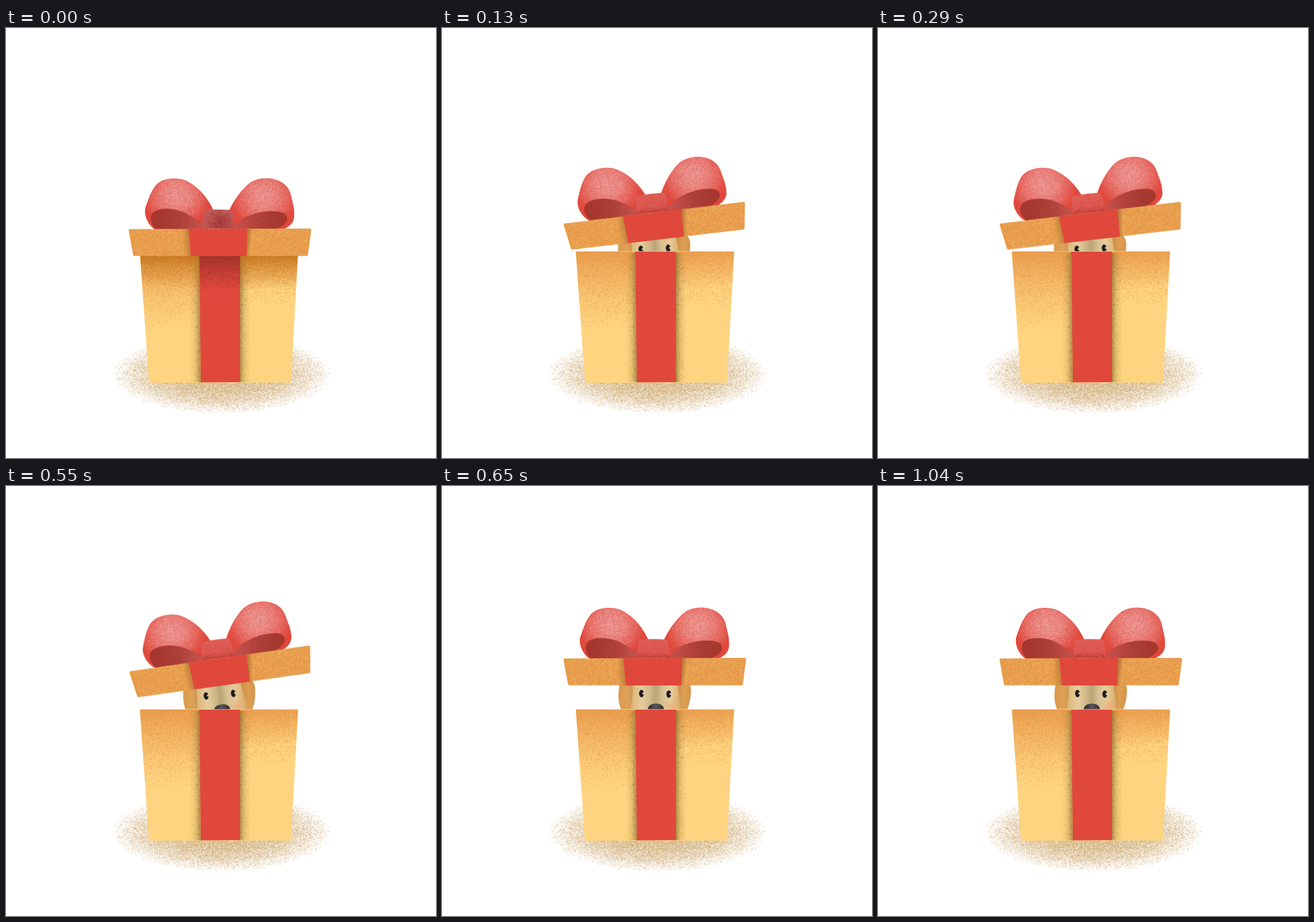
These frames come from a looping animation (748x748 px, 1300 ms). An HTML page with a canvas:

```html
<!DOCTYPE html>
<html lang="en">
<head>
<meta charset="utf-8">
<title>Puppy in a gift box</title>
<style>
  html, body { margin: 0; width: 100%; height: 100%; overflow: hidden; background: #fff; }
  canvas { display: block; width: 100vw; height: 100vh; }
</style>
</head>
<body>
<canvas id="stage" width="748" height="748"></canvas>
<script>
const start = performance.now();
const SIZE = 748, LOOP = 1300;
const RED = '#e0483c', DARK_RED = '#a5372e', ORANGE = '#e89c4c';
const stage = document.getElementById('stage').getContext('2d');

let seed = 7;
function rnd() {
  seed = (seed + 0x6D2B79F5) | 0;
  let n = Math.imul(seed ^ (seed >>> 15), 1 | seed);
  n = (n + Math.imul(n ^ (n >>> 7), 61 | n)) ^ n;
  return ((n ^ (n >>> 14)) >>> 0) / 4294967296;
}
const clamp = v => Math.max(0, Math.min(1, v));
const path = d => new Path2D(d);

function layer(draw) {
  const canvas = document.createElement('canvas');
  canvas.width = canvas.height = SIZE;
  draw(canvas.getContext('2d'));
  return canvas;
}

function fill(c, shape, style) {
  c.fillStyle = style;
  c.fill(shape);
}

// Fill and widen the shape by a stroke, which rounds its corners.
function roundFill(c, shape, style, width) {
  fill(c, shape, style);
  c.strokeStyle = style;
  c.lineWidth = width;
  c.lineJoin = 'round';
  c.stroke(shape);
}

function addStops(gradient, stops) {
  stops.forEach(([at, color]) => gradient.addColorStop(at, color));
  return gradient;
}
const linear = (c, x0, y0, x1, y1, ...stops) =>
  addStops(c.createLinearGradient(x0, y0, x1, y1), stops);
const radial = (c, x, y, r, ...stops) =>
  addStops(c.createRadialGradient(x, y, 0, x, y, r), stops);

// Scatter specks inside a shape; density(x, y) is the chance per pixel.
function grain(c, shape, [x0, y0, x1, y1], color, density, size = 1.25) {
  c.save();
  c.clip(shape);
  c.fillStyle = color;
  for (let y = y0; y < y1; y++) {
    for (let x = x0; x < x1; x++) {
      if (rnd() < density(x, y)) c.fillRect(x + rnd() - .5, y + rnd() - .5, size, size);
    }
  }
  c.restore();
}

const wholeStage = path(`M0 0H${SIZE}V${SIZE}H0Z`);
const bodyShape = path('M234 389.5H507L494.5 615.5L250 616Z');
const bodyRibbon = path('M336 389H407V616L339 616.5Z');
const leftPanel = path('M233 389H336L339 617H249Z');
const rightPanel = path('M407 389H508L495 616H407Z');
const bodyBox = [230, 386, 512, 618];

const ground = layer(c => {
  const [cx, cy, rx, ry] = [374.5, 602, 192, 69];
  const box = [182, 532, 568, 672];
  const tan = a => `rgba(201,160,98,${a})`;
  const fade = (x, y) => clamp((1 - Math.hypot((x - cx) / rx, (y - cy) / ry)) * 1.8);
  c.save();
  c.translate(cx, cy);
  c.scale(rx, ry);
  c.fillStyle = radial(c, 0, 0, 1,
    [0, tan(.62)], [.4, tan(.54)], [.65, tan(.36)], [.85, tan(.15)], [1, tan(0)]);
  c.fillRect(-1, -1, 2, 2);
  c.restore();
  grain(c, wholeStage, box, tan(.6), (x, y) => .42 * fade(x, y));
  grain(c, wholeStage, box, 'rgba(255,255,255,.6)', (x, y) => .13 * fade(x, y) ** .5);
});

const body = layer(c => {
  roundFill(c, bodyShape, '#fed480', 2.5);
  const orange = a => `rgba(232,153,74,${a})`;
  fill(c, leftPanel, linear(c, 0, 388, 0, 525,
    [0, orange(.92)], [.25, orange(.6)], [.6, orange(.22)], [1, orange(0)]));
  fill(c, rightPanel, linear(c, 0, 388, 6, 482,
    [0, orange(.95)], [.4, orange(.75)], [.75, orange(.32)], [1, orange(0)]));
  grain(c, leftPanel, bodyBox, orange(.55), (x, y) => .42 * clamp(1 - (y - 388) / 148) ** 1.5);
  grain(c, rightPanel, bodyBox, orange(.55), (x, y) => .45 * clamp(1 - (y - 388) / 100) ** 1.1);
  grain(c, bodyShape, [230, 392, 512, 480], 'rgba(250,200,118,.6)',
    (x, y) => .08 * clamp((y - 390) / 30));

  const shade = a => `rgba(137,108,48,${a})`;
  fill(c, path('M318 391H336L339 616H321Z'), linear(c, 320, 500, 338, 500,
    [0, shade(0)], [.55, shade(.16)], [1, shade(.6)]));
  fill(c, path('M407 391H425V616H407Z'), linear(c, 407, 0, 425, 0,
    [0, shade(.62)], [.4, shade(.18)], [1, shade(0)]));
  grain(c, leftPanel, [316, 392, 342, 617], shade(.3),
    (x, y) => .3 * clamp(1 - (336 + (y - 389) / 76 - x) / 16) ** 1.4);
  grain(c, rightPanel, [405, 392, 428, 617], shade(.3),
    (x, y) => .3 * clamp(1 - (x - 407) / 17) ** 1.4);
  fill(c, bodyRibbon, RED);
});

// The shade a closed lid throws on the box.
const closedShade = layer(c => {
  const panels = path('M233 389H336V617H249ZM407 389H508L495 616H407Z');
  const brown = a => `rgba(190,112,22,${a})`;
  const wine = a => `rgba(140,46,40,${a})`;
  fill(c, panels, linear(c, 0, 396, 0, 455, [0, brown(.72)], [.35, brown(.36)], [1, brown(0)]));
  grain(c, panels, [230, 394, 512, 470], brown(.45),
    (x, y) => .3 * clamp(1 - (y - 394) / 66) ** 1.6);
  fill(c, bodyRibbon, linear(c, 0, 396, 0, 455, [0, wine(.66)], [.4, wine(.34)], [1, wine(0)]));
  grain(c, bodyRibbon, [334, 394, 409, 465], wine(.42),
    (x, y) => .4 * clamp(1 - (y - 394) / 68) ** 1.4);
});

const knotShape = path(
  'M347 267Q368 265.5 389 267Q394 268 394 273L396 299H340.5L341 274Q341 268 347 267Z');

function loop(c, outer, inner, box, [hx, hy], darkX, lightX) {
  const pink = a => `rgba(240,172,170,${a})`;
  roundFill(c, outer, RED, 1.2);
  c.save();
  c.clip(outer);
  c.fillStyle = radial(c, hx, hy, 58, [0, pink(.75)], [.45, pink(.5)], [1, pink(0)]);
  c.fillRect(box[0], box[1], box[2] - box[0], box[3] - box[1]);
  c.restore();
  grain(c, outer, box, 'rgba(246,190,188,.4)',
    (x, y) => .32 * clamp(1 - Math.hypot((x - hx) / 54, (y - hy) / 48)));
  grain(c, outer, box, 'rgba(220,84,78,.4)',
    (x, y) => .16 * clamp(1 - Math.hypot(x - hx, y - hy) / 58));
  fill(c, inner, linear(c, darkX, 0, lightX, 0,
    [0, DARK_RED], [.5, '#ac3f37'], [1, '#c5504a']));
  grain(c, inner, box, 'rgba(205,95,90,.45)',
    (x, y) => .24 * clamp((x - darkX) / (lightX - darkX) - .2));
}

const lid = layer(c => {
  loop(c,
    path('M257 300C244 291 237 273 242 260C247 246 252 232 261 222C275 209 304 211 317 219.5C336 231 350 249 359 269L348 300Z'),
    path('M259 300C250 292 246 278 255 270C270 261 295 264 312 273C327 281 336 287 343 293V300Z'),
    [236, 208, 362, 301], [295, 242], 262, 340);
  loop(c,
    path('M386 269C393 254 405 236 418 224C431 211 454 209 471 216C486 222 492 233 494 245C497 258 500 268 498.5 281C496 291 490 295 481 300H390Z'),
    path('M394 300C398 288 411 280 425 275C444 268 466 267 478 271C488 274 489 282 485 288C480 295 473 298 464 300Z'),
    [382, 208, 502, 301], [446, 243], 480, 398);

  fill(c, knotShape, linear(c, 0, 267, 0, 299, [0, '#df5b53'], [.7, '#d9524a'], [1, '#c2423b']));
  grain(c, knotShape, [338, 265, 398, 300], 'rgba(232,124,118,.45)', () => .12);
  grain(c, knotShape, [338, 290, 398, 300], 'rgba(165,50,44,.4)', (x, y) => (y - 290) / 45);

  const slab = path('M214 302.5L526.5 301.5L520.8 344.2H221.6Z');
  roundFill(c, slab, ORANGE, 5);
  grain(c, wholeStage, [216, 300, 525, 346], 'rgba(248,200,124,.6)',
    (x, y) => x > 216 + (y - 300) / 6 && x < 525 - (y - 300) / 8 ? .13 : 0);
  grain(c, slab, [210, 298, 530, 348], 'rgba(217,138,54,.45)', () => .12);

  const shade = a => `rgba(150,100,40,${a})`;
  fill(c, path('M305 300H316L319 347H308Z'), linear(c, 305, 324, 318, 323,
    [0, shade(0)], [1, shade(.5)]));
  fill(c, path('M418 300H426L424 347H416Z'), linear(c, 417, 323, 425, 324,
    [0, shade(.6)], [1, shade(0)]));
  fill(c, path('M315.5 299.5L418 299L416.5 347H319.5Z'), RED);
});

const closedKnot = layer(c => {
  fill(c, knotShape, radial(c, 370, 287, 34,
    [0, 'rgba(148,52,50,.85)'], [1, 'rgba(182,88,86,.75)']));
  grain(c, knotShape, [338, 265, 398, 300], 'rgba(222,140,138,.45)',
    (x, y) => .05 + .22 * clamp(Math.hypot(x - 372, y - 290) / 34 - .2));
});

function eye(c, x, y) {
  c.fillStyle = '#1f1c1a';
  c.beginPath();
  c.ellipse(x, y, 4.2, 6.4, 0, 0, 7);
  c.fill();
  c.fillStyle = '#e9dcc0';
  c.beginPath();
  c.ellipse(x + 3.1, y - .3, 1.6, 1.8, 0, 0, 7);
  c.fill();
}

const dog = layer(c => {
  fill(c, path('M324 336H416L422 430H318Z'), linear(c, 322, 0, 418, 0,
    [0, '#cd9a57'], [.12, '#dfba7e'], [.27, '#e5cd9e'], [.4, '#d3bb8c'],
    [.52, '#bba475'], [.64, '#d6bf90'], [.78, '#e6cd9e'], [.9, '#e0b87c'], [1, '#cf9850']));
  fill(c, path('M340 370H412V420H340Z'), radial(c, 400, 385, 15,
    [0, 'rgba(242,160,112,.6)'], [1, 'rgba(242,160,112,0)']));
  fill(c, path('M310 340H331C333 360 331 380 323 400C315 402 306 380 307 364C307 357 308 348 310 340Z'),
    linear(c, 307, 0, 333, 0, [0, '#d99a4c'], [.6, '#dea158'], [1, '#cb9551']));
  fill(c, path('M409 340H427C432 346 434 352 433 360C432 376 427 392 420 400C417 385 411 360 409 340Z'),
    linear(c, 409, 0, 434, 0, [0, '#c68d46'], [.45, '#dc9f54'], [1, '#d4934a']));
  eye(c, 347, 361);
  eye(c, 394.5, 362);
  fill(c, path('M358 389C358 382 364 378.5 372 378.5C380 378.5 386 382 386 389C383 400 361 400 358 389Z'),
    radial(c, 372, 383, 15, [0, '#5b5a5c'], [.5, '#403f42'], [1, '#2f2e31']));
});

// Each pose places the lid by its left corner and the head by its middle.
const LID_PIN = [211, 300], HEAD_PIN = [371, 361.5];
const poses = [
  { until: 130, lid: [213, 349.8, 0], closed: true },
  { until: 390, lid: [211, 340.3, -6.7], head: [370, 384, -3.6] },
  { until: 650, lid: [214, 322.5, -8], head: [372, 363, -6.5] },
  { until: LOOP, lid: [211, 300, 0], head: [371, 361.5, 0] }
];

function place([x, y, degrees], [px, py], ...images) {
  stage.save();
  stage.translate(x, y);
  stage.rotate(degrees * Math.PI / 180);
  images.forEach(image => stage.drawImage(image, -px, -py));
  stage.restore();
}

function render(time) {
  const pose = poses.find(p => time < p.until);
  stage.fillStyle = '#fff';
  stage.fillRect(0, 0, SIZE, SIZE);
  stage.drawImage(ground, 0, 0);
  if (pose.head) place(pose.head, HEAD_PIN, dog);
  stage.drawImage(body, 0, 0);
  if (pose.closed) stage.drawImage(closedShade, 0, 0);
  place(pose.lid, LID_PIN, lid, ...(pose.closed ? [closedKnot] : []));
}

function tick() {
  render((performance.now() - start) % LOOP);
  requestAnimationFrame(tick);
}
tick();
</script>
</body>
</html>
```
